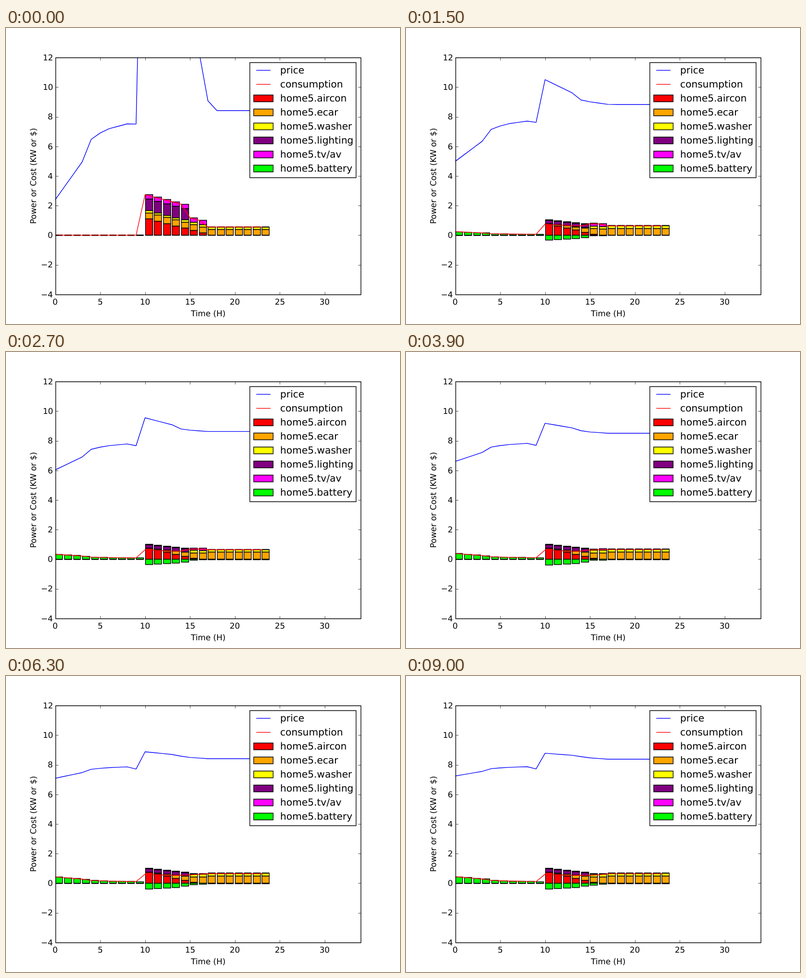
Recreate the animation shown at these times as an HTML page with a canvas. Size 812 by 612 pixels, loop 9.3 s.

```html
<!DOCTYPE html>
<html>
<head>
<meta charset="utf-8">
<style>
html, body { margin: 0; width: 812px; height: 612px; overflow: hidden; background: #fff; }
canvas { display: block; }
</style>
</head>
<body>
<canvas id="chart" width="812" height="612"></canvas>
<script>
const ctx = document.getElementById('chart').getContext('2d');
const LEFT = 101.5, RIGHT = 730.8, TOP = 61.2, BOTTOM = 550.8;
const UNIT = 30.6, BASE = 428.5, BAR_WIDTH = 0.806, THIN = 1.39;
const STEP_MS = 300, STEPS = 31;
const hours = [...Array(24).keys()];

const X = h => LEFT + h * (RIGHT - LEFT) / 34;
const Y = v => BOTTOM - (v + 4) * UNIT;
const snap = v => Math.floor(v + 0.5) + 0.5;
const settle = (from, to, rate, k) => to + (from - to) * rate ** k;

// Straight lines between key points [hour, value]
function curve(points, h) {
  const i = Math.max(1, points.findIndex(p => p[0] >= h));
  const [[x1, y1], [x2, y2]] = [points[i - 1], points[i]];
  return y1 + (y2 - y1) * (h - x1) / (x2 - x1);
}

// Each load moves from its wish to its plan, in pixels; i counts hours from 10.
// After hour 14 it adapts at its own late rate.
const loads = [
  { name: 'aircon', color: '#f00', late: 0.5,
    wish: i => Math.max(0, 34 - 4.86 * i), plan: i => Math.max(0, 23 - 4.2 * i) },
  { name: 'ecar', color: '#ffa500', late: 0.8,
    wish: i => 12.4, plan: i => 2.2 * Math.min(i, 7) },
  { name: 'washer', color: '#ff0', late: 0.8,
    wish: i => 4.6, plan: i => i < 5 ? 0 : 5.5 },
  { name: 'lighting', color: '#800080', late: 0.5,
    wish: i => i < 5 ? 23.5 : 0, plan: i => i < 5 ? 7 : 0 },
  { name: 'tv/av', color: '#f0f', late: 0.9,
    wish: i => i < 7 ? 9.2 : 0, plan: i => i < 7 ? 0.8 : 0 }
];
const BATTERY = '#0f0';

function loadAt({ wish, plan, late }, h, k) {
  const i = h - 10;
  return i < 0 ? 0 : settle(wish(i), plan(i), i < 5 ? 0.5 : late, k);
}

// Battery plan: charging by night, discharging from hour 10
const planned = h => h < 10
  ? curve([[0, 0.445], [3, 0.285], [4, 0.19], [5.5, 0.15], [9, 0.115]], h)
  : curve([[10, -0.4], [13, -0.285], [15, -0.13], [17, -0.05], [23, -0.05]], h);

const batteryAt = (h, k) =>
  settle(0, planned(h), h < 10 ? 0.86 : h < 15 ? 0.74 : 0.93, k);

// Night prices fall and day prices rise with the planned battery power
function priceAt(h, k) {
  const slow = 0.86 ** k, power = planned(h);
  if (h < 10) {
    const level = curve([[0, 7.9], [8, 7.92], [9, 7.75]], h);
    return level - (power - 0.1) * (1.75 + 14.2 * slow);
  }
  const drain = -power;
  const flat = 8.37 + 1.08 * (drain - 0.05) + slow - 0.95 * 0.4 ** k;
  const peak = 11.7 * Math.max(0, drain - 0.22) * slow;
  const shock = 3.3 * Math.max(0, 17.2 - h) * 0.42 ** k;
  return flat + peak + shock;
}

const consumptionAt = (h, k) =>
  loads.reduce((sum, load) => sum + loadAt(load, h, k), 0) / UNIT + batteryAt(h, k);

function box(x1, y1, x2, y2, fill) {
  ctx.lineWidth = THIN;
  ctx.strokeStyle = '#000';
  ctx.lineCap = 'butt';
  ctx.lineJoin = 'miter';
  ctx.beginPath();
  ctx.moveTo(x1, y1);
  ctx.lineTo(x2, y1);
  ctx.lineTo(x2, y2);
  ctx.lineTo(x1, y2);
  ctx.closePath();
  if (fill) {
    ctx.fillStyle = fill;
    ctx.fill();
  }
  ctx.stroke();
}

function line(points, color, width = THIN, cap = 'square') {
  ctx.lineWidth = width;
  ctx.strokeStyle = color;
  ctx.lineCap = cap;
  ctx.lineJoin = 'round';
  ctx.beginPath();
  points.forEach(([x, y]) => ctx.lineTo(x, y));
  ctx.stroke();
}

// Text starts on a whole pixel; align is the share of its width left of x
function text(str, x, y, align = 0, size = 16.667) {
  ctx.font = size + 'px "DejaVu Sans", sans-serif';
  ctx.textRendering = 'geometricPrecision';
  ctx.fillStyle = '#000';
  const width = ctx.measureText(str).width;
  ctx.fillText(str, Math.round(x - width * align), Math.round(y));
}

function drawBars(k) {
  for (const h of hours) {
    const bar = (from, to, color) => box(
      snap(X(h)), BASE - Math.round(from),
      snap(X(h + BAR_WIDTH)), BASE - Math.round(to), color);
    let top = 0;
    for (const load of loads) {
      const next = top + loadAt(load, h, k);
      bar(top, next, load.color);
      top = next;
    }
    bar(0, batteryAt(h, k) * UNIT, BATTERY);
  }
}

function drawAxes() {
  const tick = (x, y, dx, dy) => line([[x, y], [x + dx, y + dy]], '#000', 0.69, 'butt');
  box(snap(LEFT), snap(TOP), snap(RIGHT), snap(BOTTOM));
  for (let h = 0; h <= 30; h += 5) {
    const x = snap(X(h));
    tick(x, snap(BOTTOM), 0, -5.56);
    tick(x, snap(TOP), 0, 5.56);
    text(String(h), X(h), 571.6, 0.5);
  }
  for (let v = -4; v <= 12; v += 2) {
    const y = snap(Y(v));
    tick(snap(LEFT), y, 5.56, 0);
    tick(snap(RIGHT), y, -5.56, 0);
    text(String(v).replace('-', '\u2212'), 97, Y(v) + 5.8, 1);
  }
  text('Time (H)', 416.5, 596, 0.5);
  ctx.save();
  ctx.translate(62, 306);
  ctx.rotate(-Math.PI / 2);
  text('Power or Cost (KW or $)', 0, 0, 0.5);
  ctx.restore();
}

function drawLegend() {
  box(502.5, 71.5, 721.5, 309.5, '#fff');
  [['price', '#00f'], ['consumption', '#f00']].forEach(([name, color], i) => {
    const y = 87.5 + 29 * i;
    line([[516.5, y], [544.5, y]], color);
    text(name, 565, y + 6.5, 0, 20);
  });
  [...loads, { name: 'battery', color: BATTERY }].forEach(({ name, color }, i) => {
    const y = 138.5 + 29 * i;
    box(510.5, y, 550.5, y + 14, color);
    text('home5.' + name, 565, y + 13.5, 0, 20);
  });
}

function draw(k) {
  ctx.fillStyle = '#fff';
  ctx.fillRect(0, 0, 812, 612);
  ctx.save();
  ctx.beginPath();
  ctx.rect(LEFT, TOP, RIGHT - LEFT, BOTTOM - TOP);
  ctx.clip();
  drawBars(k);
  line(hours.map(h => [X(h), Y(priceAt(h, k))]), '#00f');
  line(hours.map(h => [X(h), Y(consumptionAt(h, k))]), '#f00');
  ctx.restore();
  drawAxes();
  drawLegend();
}

const start = performance.now();
function tick() {
  const elapsed = Math.max(0, performance.now() - start);
  draw(Math.floor(elapsed / STEP_MS) % STEPS);
  requestAnimationFrame(tick);
}
tick();
</script>
</body>
</html>
```
